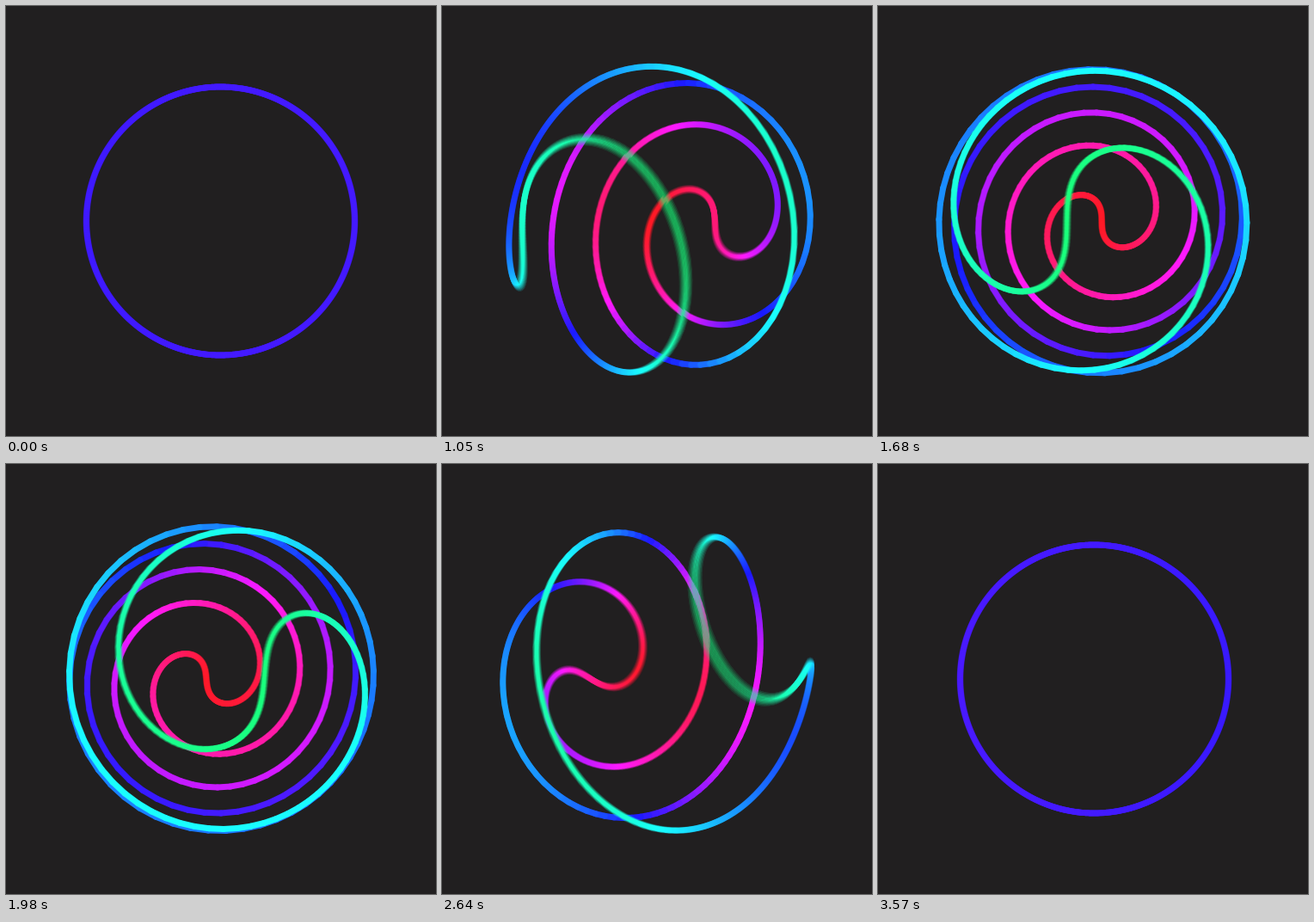
Recreate the animation shown at these times as an HTML page with a canvas. Size 500 px wide and 500 px high, loop 3600 ms.

```html
<!DOCTYPE html>
<html>
<head>
<meta charset="utf-8">
<title>Twisting ring</title>
<style>
  html, body { margin: 0; width: 100%; height: 100%; overflow: hidden; background: #211f20; }
  canvas { display: block; }
</style>
</head>
<body>
<canvas id="stage" width="500" height="500"></canvas>
<script>
const SIZE = 500, LOOP = 3600, STEP = 30;
const RADIUS = 156, CAMERA = 2, TURNS = 1.5;
const SEGMENTS = 480, SAMPLES = 8, SHUTTER = 15;

const stage = document.getElementById('stage').getContext('2d');
const layer = document.createElement('canvas');
layer.width = layer.height = SIZE;
const pen = layer.getContext('2d');
pen.lineWidth = 7;
pen.lineCap = 'round';

const smoother = u => u * u * u * (10 - 15 * u + 6 * u * u);

// A great circle twisted about its x axis, turned about y, seen in perspective.
function project(phi, turn, twist) {
  const x = Math.cos(phi), s = Math.sin(phi);
  const y = s * Math.cos(twist * x), z = s * Math.sin(twist * x);
  const depth = z * Math.cos(turn) - x * Math.sin(turn);
  const scale = RADIUS * CAMERA / (CAMERA - depth);
  return {
    x: SIZE / 2 + scale * (x * Math.cos(turn) + z * Math.sin(turn)),
    y: SIZE / 2 + scale * y,
    depth
  };
}

function drawRing(time) {
  const p = time / LOOP;
  const turn = Math.PI * p;
  const twist = -2 * Math.PI * TURNS * smoother(1 - Math.abs(1 - 2 * p));
  const points = Array.from({ length: SEGMENTS + 1 },
    (_, i) => project(2 * Math.PI * i / SEGMENTS, turn, twist));
  const segments = points.slice(1).map((b, i) => ({ a: points[i], b, depth: (points[i].depth + b.depth) / 2 }));
  segments.sort((m, n) => m.depth - n.depth);

  pen.fillStyle = '#211f20';
  pen.fillRect(0, 0, SIZE, SIZE);
  for (const { a, b, depth } of segments) {
    pen.strokeStyle = `hsl(${251 - 106 * depth}, 100%, 55%)`;
    pen.beginPath();
    pen.moveTo(a.x, a.y);
    pen.lineTo(b.x, b.y);
    pen.stroke();
  }
}

// Motion blur: a running average of several moments while the shutter is open.
function render(time) {
  for (let k = 0; k < SAMPLES; k++) {
    drawRing(time + SHUTTER * (k + 0.5) / SAMPLES);
    stage.globalAlpha = 1 / (k + 1);
    stage.drawImage(layer, 0, 0);
  }
}

let shown = -1;
const start = performance.now();
function tick() {
  const time = Math.floor((performance.now() - start) % LOOP / STEP) * STEP;
  if (time !== shown) render(shown = time);
  requestAnimationFrame(tick);
}
tick();
</script>
</body>
</html>
```
